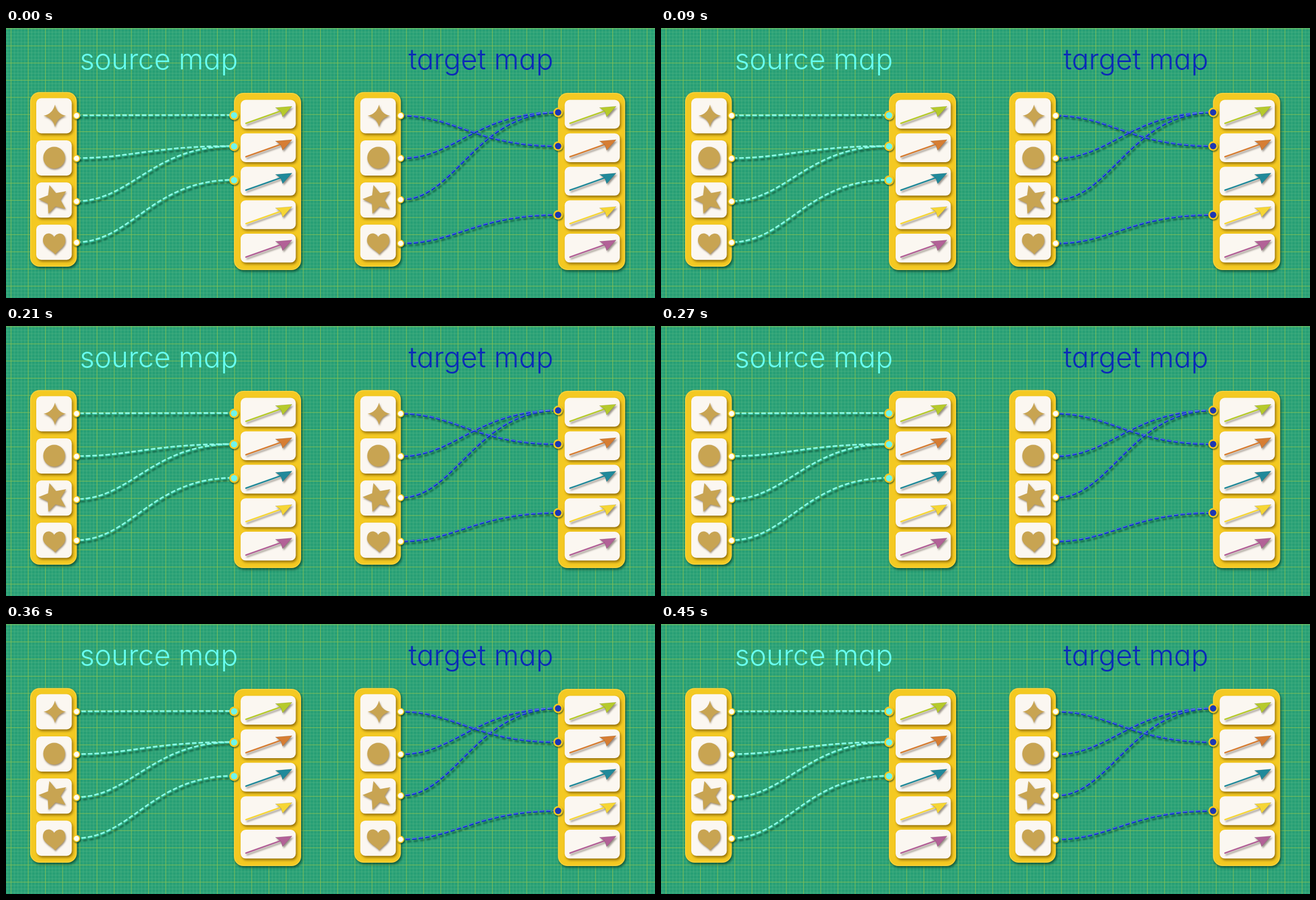
Write an HTML page that moves like this. It is 1159x483 px and loops after 480 ms.

```html
<!DOCTYPE html>
<html lang="en">
<head>
<meta charset="utf-8">
<title>Source map and target map</title>
<style>
html, body { margin: 0; width: 100%; height: 100%; overflow: hidden; background: #279f75; }
svg { display: block; width: 1159px; height: 483px; }
text { font: 300 51px Inter, Lato, sans-serif; font-feature-settings: "cv11"; text-anchor: middle; }
.panel { fill: #f4c922; filter: drop-shadow(2.5px 3.5px 2px rgba(0,50,30,.65)); }
.edge { fill: none; stroke: #ffe06a; stroke-width: 1; opacity: .6; }
.tile { fill: #fbf7f1; filter: drop-shadow(2px 3px 2px rgba(110,75,0,.7)); }
.shape { fill: #c8a452; filter: drop-shadow(1.5px 2.5px 1.5px rgba(90,65,30,.6)); }
.arrow { filter: drop-shadow(2px 3px 1.5px rgba(60,50,40,.5)); }
.dot { filter: drop-shadow(1.5px 2px 1px rgba(0,50,30,.6)); }
.links { fill: none; stroke-dasharray: 8 3.7; }
.shadow { filter: blur(1.2px); }
</style>
</head>
<body>
<svg id="stage" viewBox="0 0 1159 483">
  <defs>
    <pattern id="grid" x="8.5" y="0.8" width="30.7" height="30.7" patternUnits="userSpaceOnUse">
      <path id="minor" fill="none" stroke="#62c08c" stroke-width=".8" opacity=".55"/>
      <path d="M.5 0V30.7M0 .5H30.7" stroke="#8fc653" stroke-width="1" opacity=".9"/>
    </pattern>
  </defs>
  <rect width="1159" height="483" fill="#279f75"/>
  <rect width="1159" height="483" fill="url(#grid)"/>
  <text x="273" y="74" fill="#68fff0">source map</text>
  <text x="848" y="74" fill="#0b2ab8">target map</text>
  <g id="maps"></g>
</svg>
<script>
const LOOP = 480, STEP = 30, PERIOD = 11.7;
const arrowColors = ['#b6ca2b', '#d67d33', '#20899a', '#f6d635', '#b26197'];

const box = (x, y, w, h, r, cls) =>
  `<rect class="${cls}" x="${x}" y="${y}" width="${w}" height="${h}" rx="${r}"/>`;

const panel = (x, y, w, h) =>
  box(x, y, w, h, 17, 'panel') + box(x + 1, y + 1, w - 2, h - 2, 16, 'edge');

function starPoints(cx, cy, r) {
  return Array.from({ length: 10 }, (_, i) => {
    const a = (i * 36 - 106) * Math.PI / 180, d = i % 2 ? r * .46 : r;
    return `${cx + d * Math.cos(a)},${cy + d * Math.sin(a)}`;
  }).join(' ');
}

const shapes = `<g class="shape">
  <path d="M87.5 137Q90.5 153.5 107 157Q90.5 160.5 87.5 177Q83.5 160.5 67 157Q83.5 153.5 87.5 137Z"/>
  <circle cx="86" cy="232" r="19.5"/>
  <polygon points="${starPoints(85, 307, 27)}"/>
  <path d="M86 374C91 365 106 365 106 380C106 392 94 396 88 405C82 397 66 392 66 380C66 365 81 364 86 374Z"/>
</g>`;

const arrow = (color, i) => `<g class="arrow" transform="translate(0 ${i * 59.8})">
  <path d="M428.5 170.5L492 148" stroke="${color}" stroke-width="2.6" stroke-linecap="round"/>
  <path d="M511 140L481 142.5L490.5 148.7L494 159Z" fill="${color}" stroke="rgba(0,0,0,.2)" stroke-width=".6"/>
</g>`;

const panels = panel(43, 114.5, 83.5, 312.5) + panel(407, 116, 120, 317) +
  [0, 1, 2, 3].map(i => box(54, 125.5 + i * 75.4, 63.5, 63, 9, 'tile')).join('') +
  arrowColors.map((_, i) => box(419, 128.5 + i * 59.9, 98.5, 51.5, 9, 'tile')).join('') +
  shapes + arrowColors.map(arrow).join('');

const dot = (x, y, r, ring, fill) =>
  `<circle class="dot" cx="${x}" cy="${y}" r="${r + ring}" fill="#f4c922"/>` +
  `<circle cx="${x}" cy="${y}" r="${r}" fill="${fill}"/>`;

// links: pairs of start and end heights
function map(dx, links, base, shine, fill) {
  const path = links.map(([a, b]) => `M126 ${a}C224 ${a} 260 ${b} 407 ${b}`).join('');
  const ends = [...new Set(links.map(l => l[1]))];
  return `<g transform="translate(${dx} 0)">${panels}
    <g class="links">
      <path class="shadow" d="${path}" transform="translate(2.5 4)" stroke="rgba(0,60,40,.5)" stroke-width="3.5"/>
      <path d="${path}" stroke="${base}" stroke-width="3.6"/>
      <path d="${path}" transform="translate(-.4 -.8)" stroke="${shine[0]}" stroke-width="${shine[1]}"/>
    </g>
    ${links.map(l => dot(126, l[0], 4.7, 1.8, '#fffdf5')).join('')}
    ${ends.map(y => dot(407.3, y, 5.7, 2.8, fill)).join('')}
  </g>`;
}

document.getElementById('minor').setAttribute('d', [1, 2, 3, 4]
  .map(i => i * 6.14 + .5)
  .map(p => `M${p} 0V30.7M0 ${p}H30.7`).join(''));

document.getElementById('maps').innerHTML =
  map(0, [[156.7, 156.3], [233.3, 211.7], [310.3, 211.7], [383.7, 272.2]],
    '#40d0b0', ['#94fbe8', 2.4], '#6ff5ea') +
  map(578.7, [[156.7, 211.3], [233, 151], [307, 151], [385.3, 334.3]],
    '#0f2fc6', ['#7d9df2', .9], '#1c37b4');

const links = document.querySelectorAll('.links');
function draw(now) {
  const phase = Math.floor(now % LOOP / STEP) * STEP / LOOP;
  links.forEach(g => g.style.strokeDashoffset = -phase * PERIOD);
  requestAnimationFrame(draw);
}
draw(performance.now());
</script>
</body>
</html>
```
